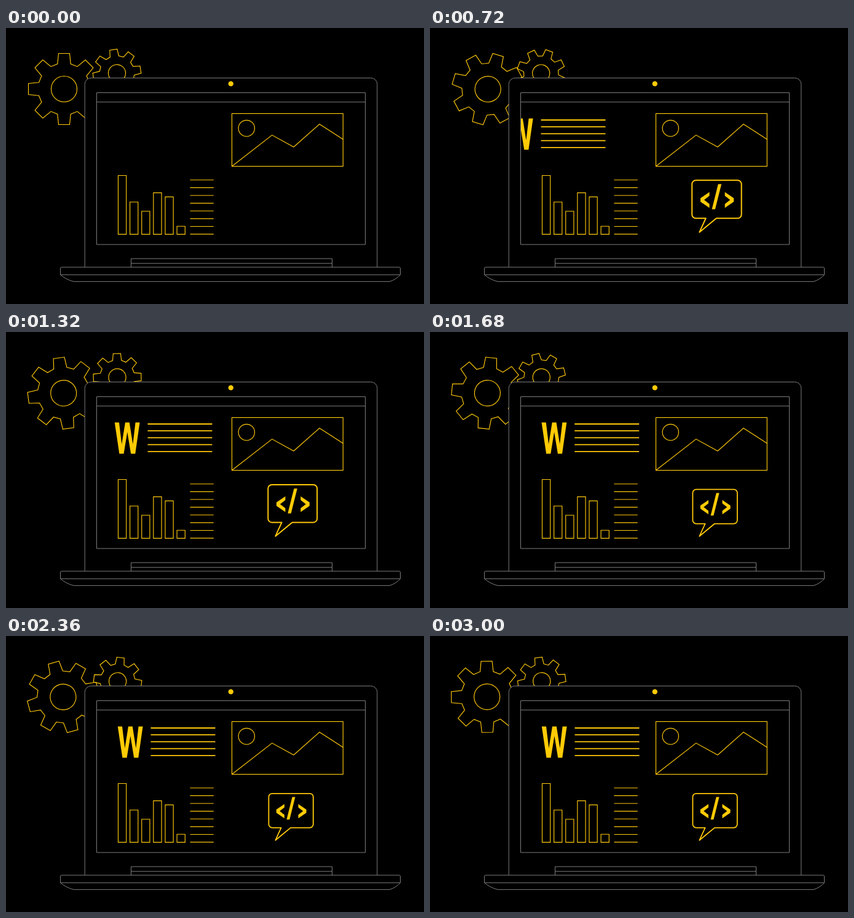
Write an HTML page that moves like this. It is 680 px wide and 450 px high and loops after 3.04 s.

```html
<!DOCTYPE html>
<html lang="en">
<head>
<meta charset="utf-8">
<title>Laptop and gears</title>
<style>
  html, body { margin: 0; width: 100%; height: 100%; overflow: hidden; background: #000; }
  svg { display: block; width: 680px; height: 450px; }
  .line { fill: none; stroke: #ffc80a; stroke-width: 1.15; }
  .bold { stroke-width: 1.8; }
  .solid { fill: #ffcb05; }
  .case { fill: none; stroke: #7c7c7c; stroke-width: 1; }
  .body { fill: #000; }
</style>
</head>
<body>
<svg viewBox="0 0 680 450">
  <defs>
    <clipPath id="screen"><rect x="148" y="121" width="436.5" height="232"/></clipPath>
  </defs>

  <g id="big" class="line"></g>
  <g id="small" class="line"></g>

  <path class="case body" d="M128.2 390V91.5a10 10 0 0 1 10-10H593.8a10 10 0 0 1 10 10V390"/>
  <path class="case body" d="M88.5 402.3V392a2 2 0 0 1 2-2H639.5a2 2 0 0 1 2 2V402.3Q634 410.5 624 413.4H110Q98 410.5 88.5 402.3H641.5"/>
  <path class="case" d="M147.5 105.5H584.5V353H147.5ZM147.5 120.7H584.5M203.5 390V376H530.5V390M203.5 383.8H530.5"/>
  <circle class="solid" cx="365.8" cy="90.9" r="4.2"/>

  <g class="line">
    <rect x="367.5" y="139.5" width="180.8" height="86"/>
    <path d="M367.5 225.5L432.8 174.6L468 194L510 156.7L548.3 181.5"/>
    <circle cx="391.3" cy="163.5" r="13.2"/>
    <path id="bars"/>
    <path id="rules"/>
  </g>

  <g clip-path="url(#screen)">
    <g id="text">
      <path class="solid" d="M181.8 147.5H189L193.3 183L199 147.5H205.8L211.4 183L215.6 147.5H222.6L215.3 198.5H208.2L202.4 163L196.6 198.5H189.4Z"/>
      <path id="rows" class="line bold"/>
    </g>
  </g>

  <g id="bubble">
    <path class="line bold" stroke-linejoin="round" d="M433 256.8H494.2a5.6 5.6 0 0 1 5.6 5.6V307a5.6 5.6 0 0 1-5.6 5.6H463L438.3 333L447.6 312.6H433a5.6 5.6 0 0 1-5.6-5.6V262.4a5.6 5.6 0 0 1 5.6-5.6Z"/>
    <path id="angle" class="solid" d="M452.9 274V279.6L445.2 285.6L452.9 291.6V297.2L439.8 288.2V283Z"/>
    <use href="#angle" transform="translate(928.4 0) scale(-1 1)"/>
    <path class="solid" d="M465.7 262.5H470.5L461.3 299.3H456.5Z"/>
  </g>
</svg>
<script>
const LOOP = 3040, STEP = 40;
const $ = id => document.getElementById(id);

// Eight tapered teeth around a hub, drawn about the origin.
function gear(scale) {
  const tooth = [[-10.7, -41], [-9, -58], [9, -58], [10.7, -41]];
  const points = [];
  for (let i = 0; i < 8; i++) {
    const c = Math.cos(i * Math.PI / 4), s = Math.sin(i * Math.PI / 4);
    for (const [x, y] of tooth) {
      points.push([(x * c - y * s) * scale, (x * s + y * c) * scale]);
    }
  }
  return `<polygon points="${points.join(' ')}"/><circle r="${21 * scale}"/>`;
}

function rows(count, x1, x2, y, gap) {
  return Array.from({ length: count }, (_, i) => `M${x1} ${y + i * gap}H${x2}`).join('');
}

$('big').innerHTML = gear(1);
$('small').innerHTML = gear(0.67);
$('rows').setAttribute('d', rows(5, 235.5, 340.5, 150, 11.2));
$('rules').setAttribute('d', rows(8, 299.5, 337.8, 247.7, 12.63));
$('bars').setAttribute('d', [240.5, 283.7, 298.7, 268.6, 275.3, 323.2]
  .map((top, i) => `M${182.5 + i * 19.12} 336.4V${top}h13.2V336.4Z`).join(''));

const clamp = v => Math.min(1, Math.max(0, v));
const easeOut = (p, power) => 1 - (1 - clamp(p)) ** power;
const smooth = p => { p = clamp(p); return p * p * (3 - 2 * p); };
const softSpin = p => (p + (1 - Math.cos(Math.PI * p)) / 2) / 2;
const move = (id, value) => $(id).setAttribute('transform', value);

function draw(t) {
  const turn = 90 * softSpin(t / LOOP);
  // The pivots sit slightly off the hubs, so the gears wobble.
  move('big', `translate(93.8 98.4) rotate(${turn}) translate(.7 1.1)`);
  move('small', `translate(181.15 73.05) rotate(${-turn}) translate(-.65 .65) rotate(-8.5)`);

  move('text', `translate(${-297 * (1 - easeOut(t / 2000, 3.78))} 0)`);

  const size = 1.15 * easeOut(t / 1000, 2.66) - 0.15 * smooth((t - 1080) / 640);
  move('bubble', `translate(438 333.5) scale(${size}) translate(-438 -333.5)`);
  $('bubble').style.display = size > 0 ? '' : 'none';
}

let start;
function tick(now) {
  start ??= now;
  const t = Math.max(0, now - start) % LOOP;
  draw(Math.floor(t / STEP) * STEP);
  requestAnimationFrame(tick);
}
draw(0);
requestAnimationFrame(tick);
</script>
</body>
</html>
```
